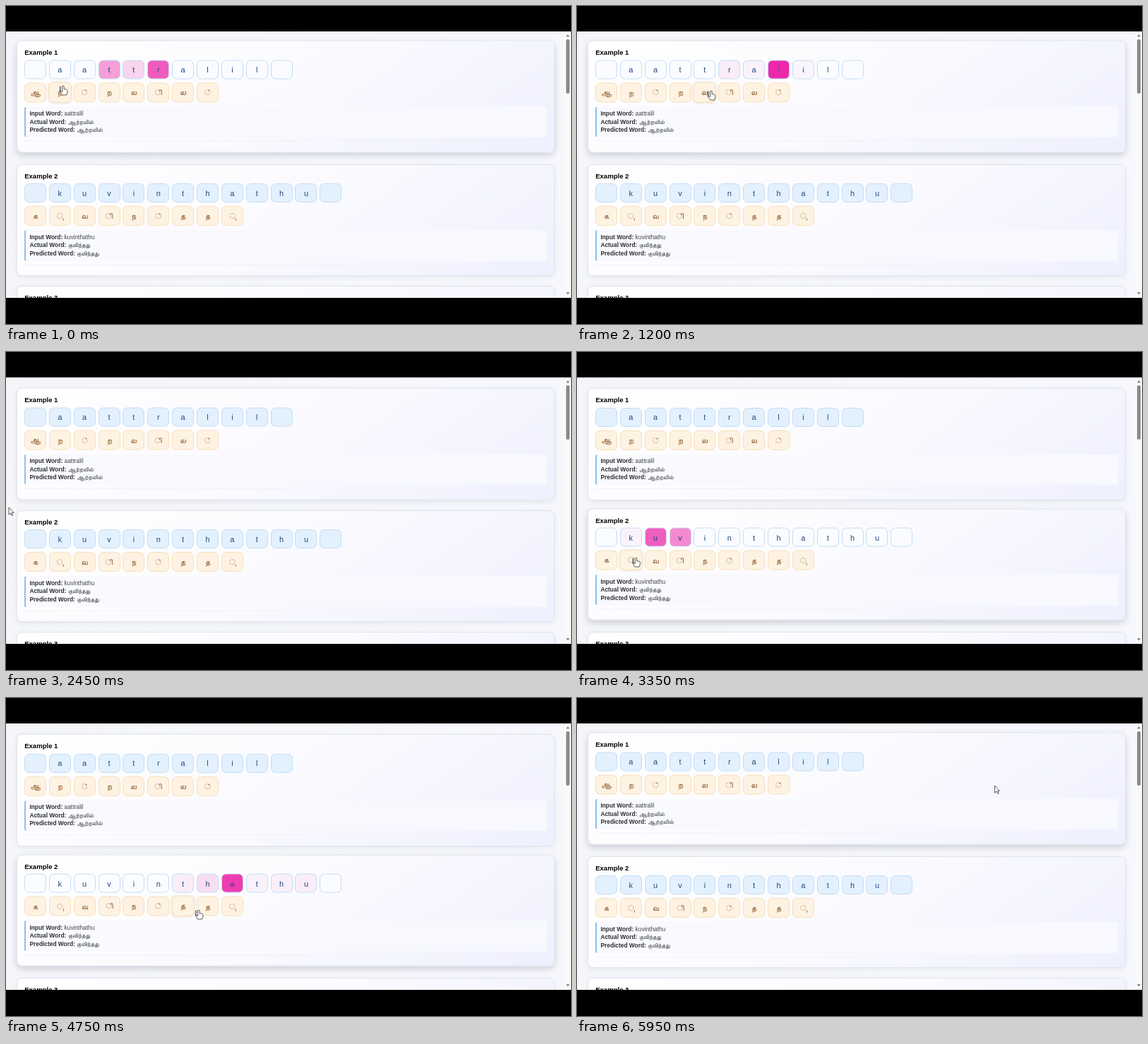
These frames come from a looping animation (800 by 450 pixels, 6000 ms). An HTML page:

```html
<!DOCTYPE html>
<html lang="en">
<head>
<meta charset="utf-8">
<title>Letter attention</title>
<style>
html, body { margin: 0; width: 100%; height: 100%; overflow: hidden; background: #000; }
#stage { position: relative; width: 800px; height: 450px; overflow: hidden; background: #000;
  font-family: "Liberation Sans", Arial, sans-serif; }
#page { position: absolute; top: 36px; width: 800px; height: 376.5px; overflow: hidden;
  background: linear-gradient(100deg, #f4f6fa, #f7f8fd); }
#page *, #cursor { position: absolute; box-sizing: border-box; }
.card { left: 14.5px; width: 762px; height: 158.5px; border: .8px solid #e1e4ee; border-radius: 8px;
  background: linear-gradient(145deg, #fff 0%, #fbfbff 45%, #eff0fe 100%); }
.card h3 { margin: 0; left: 10.7px; top: 10.2px; font-size: 9.55px; line-height: 12px; color: #000; white-space: nowrap; }
.tile { width: 31px; border: 1px solid #c3dcf6; border-radius: 6.5px; display: flex;
  align-items: center; justify-content: center; font-size: 11px; }
#page .tile > *, #page .info b, #page .info svg, #page .info span { position: static; }
.in { top: 26.4px; height: 27px; }
.out { top: 58.3px; height: 28px; background: #fef2e2; border-color: #f9dfb9; color: #85501f; }
.info { left: 10.7px; top: 92.4px; width: 740px; height: 43.5px; border-left: 2px solid #8fbfea;
  border-radius: 3px; background: rgba(249, 250, 255, .9); font-size: 8.4px; color: #41454b; }
.info p { margin: 0; left: 5.2px; line-height: 11px; white-space: pre; }
.info b { color: #2d3036; }
.rule { left: 10.7px; top: 140.8px; width: 740px; height: 1px; background: #f0f1f8; }
svg { overflow: visible; }
.glyph { fill: none; stroke: currentColor; stroke-linecap: round; stroke-linejoin: round; }
#bar { left: 791px; top: 0; width: 9px; height: 377px; background: #fafafb; }
#thumb { left: 2px; top: 10.5px; width: 5px; height: 77.5px; border-radius: 2.5px; background: #8b8b8b; }
#cursor { left: 0; top: 0; }
</style>
</head>
<body>
<div id="stage">
  <div id="page">
    <div id="bar">
      <div id="thumb"></div>
      <svg width="9" height="377" fill="#858585"><path d="M2 7.5 4.5 4 7 7.5ZM2 369 4.5 372.5 7 369Z"/></svg>
    </div>
  </div>
  <svg id="cursor" width="12" height="16" fill="#fff" stroke="#333" stroke-width=".8" stroke-linejoin="round">
    <path id="arrow" d="M0 0V10.2L2.4 8 4 11.6 5.6 10.9 4 7.4H7Z"/>
    <path id="hand" d="M-1.3 .8Q0-.6 1.2.8V5L2.2 4.6 3.4 5.1 4.5 5.2 5.8 6.3V9.6L4.6 13H-1.4L-4.3 8.4Q-4-7.2 -4.3 8.4Q-3.8 6.8 -2.4 7.7L-1.3 8.6Z"/>
  </svg>
</div>
<script>
const LOOP = 6000, STEP = 50, TOP = 36;
const $ = id => document.getElementById(id);

// Tamil letters as pen strokes: [advance, path], baseline at 0
const loop = "M3-5A2.5 2.5 0 1 0 3 0A2.5 2.5 0 1 0 3-5M.5-2.5Q0-10 4.3-10Q8-10 8-5";
const ka = "M1-10H11M5-10V0Q0 0 0-2.5Q0-5 5-5H9Q13-5 13-2.5";
const ta = "M1-10H10M5-10V0Q0 0 0-2.5Q0-5 5-5H9Q13-5 13-1.5";
const ring = "M4-8A3.8 3.8 0 1 0 4-.4A3.8 3.8 0 1 0 4-8";
const PEN = {
  "ஆ": [18, "M3-3A2.2 2.2 0 1 1 6-5Q6 0 3 0Q0 0 0-5Q0-10 4.5-10Q9-10 9-5Q9 2 4 3M9-4H14M14-10V2Q14 5 11 5Q9 5 9 3Q9 1 12 1H17"],
  "ற": [15, "M1 0V-6Q1-10 4-10Q7-10 7-6V0M7-6Q7-10 10-10Q13-10 13-6Q13-1 9 2Q6 4 3 4"],
  "ல": [16, loop + "V-3Q8 0 11 0Q14 0 14-4V-10"],
  "வ": [15, loop + "Q8 0 3 0H13V-10"],
  "க": [15, ka + "Q13 0 10 0"],
  "த": [15, ta + "Q13 3 5 4"],
  "ந": [15, "M1-10H9M4-10V0H8V-2Q8-6 10.5-6Q13-6 13-2Q13 3 6 4"],
  "கு": [16, ka + "Q14 4 6 4Q1 4 0 2"],
  "து": [18, ta + "Q13 3 5 4M13-2Q13 0 16 0V-10"]
};
const SIGN = {
  "்": [0, "M-8-13.4h.1"],
  "ி": [5, "M-2-10Q-2-13.5 1-13.5Q3.5-13.5 3.5-9V0"],
  "ு": [9, "M0-7H2V0M2-4Q2.5-7 5-7Q8-7 8-4V0"]
};

const pen = document.createElement("canvas").getContext("2d");
const width = ch => pen.measureText(ch).width;
const hasTamil = width("ஆ") !== width("ற");

function tamil(word, scale) {
  if (hasTamil) return `<span>${word}</span>`;
  let x = 0, body = "";
  const add = (d, extra = "") => body += `<path transform="translate(${x})" d="${d}" ${extra}/>`;
  for (const part of word.match(/[கத]ு|./gu)) {
    if (SIGN[part]) {
      if (!x) { add(ring, 'stroke-dasharray=".2 1.8"'); x = 9; }
      const dot = part === "்";
      const [adv, d] = SIGN[part];
      add(dot && word.length === 1 ? "M-5-12.6h.1" : d, dot ? 'stroke-width="2.2"' : "");
      x += adv;
    } else {
      add(PEN[part][1]);
      x += PEN[part][0];
    }
  }
  const w = x - 1.5;
  return `<svg class="glyph" aria-label="${word}" width="${w * scale}" height="${18 * scale}" ` +
    `viewBox="0 -14 ${w} 18" stroke-width="1.45" style="vertical-align:${-4 * scale}px">${body}</svg>`;
}

// heat[j] maps input letter -> weight while output letter j is hovered
const DATA = [
  { top: 51.3, latin: "aattralil", word: "ஆற்றலில்", heat: [
    { 1: .8, 2: .4 }, { 3: .42, 4: .18, 5: .72 }, { 4: .3, 5: .8 }, { 5: .85, 6: .1 },
    { 5: .03, 6: .04, 7: 1, 8: .04 }, { 8: .85, 9: .1 }, { 8: .1, 9: .9 }, { 9: .6, 10: .35 }] },
  { top: 223.8, latin: "kuvinthathu", word: "குவிந்தது", heat: [
    { 1: .85, 2: .15 }, { 2: .74, 3: .54 }, { 3: .8, 4: .2 }, { 4: .75, 5: .11, 6: .27, 7: .12 },
    { 5: .8, 6: .15 }, { 6: .8, 7: .2 }, { 6: .03, 7: .13, 8: .9, 9: .05, 10: .06, 11: .07 },
    { 9: .8, 10: .3 }, { 10: .1, 11: .8 }] },
  { top: 396, latin: "", word: "", heat: [] }
];

function make(parent, cls, html = "", css = {}, tag = "div") {
  const el = document.createElement(tag);
  el.className = cls;
  el.innerHTML = html;
  Object.assign(el.style, css);
  parent.append(el);
  return el;
}

const cards = DATA.map((d, n) => {
  const box = make($("page"), "card", "", { top: d.top - TOP + "px" });
  make(box, "", `Example ${n + 1}`, {}, "h3");
  if (!d.word) return { box, ins: [], outs: [] };
  const at = i => ({ left: 10.4 + 34.87 * i + "px" });
  const ins = [...` ${d.latin} `].map((ch, i) => make(box, "tile in", ch.trim(), at(i)));
  const outs = [...d.word].map((ch, i) => make(box, "tile out", tamil(ch, .69), at(i)));
  const info = make(box, "info");
  const word = tamil(d.word, .46);
  [["Input", d.latin], ["Actual", word], ["Predicted", word]].forEach(([name, value], i) =>
    make(info, "", `<b>${name} Word:</b> ${value}`, { top: 4.6 + 11.4 * i + "px" }, "p"));
  make(box, "rule");
  return { box, ins, outs };
});

const PATH = [
  [0, 81, 113], [1200, 190, 120], [1650, 288, 124], [1850, 270, 170], [2050, 130, 190],
  [2300, 12, 204], [2400, 4, 220], [2550, 4, 220], [2750, 24, 262], [3000, 40, 288],
  [3150, 68, 292], [3350, 83.5, 291], [4000, 170, 295], [4750, 273, 300], [5100, 322, 298],
  [5250, 332, 275], [5450, 390, 235], [5700, 540, 160], [5900, 590, 125], [5950, 591.5, 124]
];
const mix = (a, b, p) => a + (b - a) * p;
const blend = (a, b, p) => a.map((v, i) => mix(v, b[i], p));
const rgb = c => `rgb(${c.map(Math.round)})`;

function pointer(t) {
  const k = Math.max(1, PATH.findIndex(p => p[0] >= t));
  const [a, b] = [PATH[k - 1], PATH[k]];
  const p = (t - a[0]) / (b[0] - a[0]);
  return { x: mix(a[1], b[1], p), y: mix(a[2], b[2], p) };
}

function hover({ x, y }) {
  const card = x < 15 ? -1 : DATA.findIndex(d => y > d.top - 2.5 && y < d.top + 157);
  if (card < 0) return { card, tile: -1 };
  const dy = y - DATA[card].top;
  const tile = Math.floor((x - 30.5) / 35);
  const inRow = dy > 56 && dy < 86 && tile >= 0 && tile < cards[card].outs.length;
  return { card, tile: inRow ? tile : -1 };
}

// Ease every value towards its hover goal, one step at a time
function advance(old, h, rate, slow) {
  return cards.map((c, n) => {
    const tile = h.card === n ? h.tile : -1;
    const heat = DATA[n].heat[tile] || {};
    const o = old[n];
    return {
      lift: mix(o.lift, h.card === n ? 1 : 0, slow),
      idle: mix(o.idle, tile < 0 ? 1 : 0, rate),
      heat: o.heat.map((v, i) => mix(v, heat[i] || 0, rate)),
      grow: o.grow.map((v, i) => mix(v, i === tile ? 1 : 0, rate))
    };
  });
}

const blank = cards.map(c => ({ lift: 0, idle: 1, heat: c.ins.map(() => 0), grow: c.outs.map(() => 0) }));
const steps = [];
let state = advance(blank, hover(pointer(0)), 1, 1);
for (let t = 0; t < LOOP; t += STEP) {
  const pos = pointer(t), h = hover(pos);
  state = advance(state, h, .45, .35);
  steps.push({ pos, hand: h.tile >= 0, state });
}

const PALE = [251, 252, 255], PINK = [236, 29, 165], BLUE = [227, 241, 254];
const INK = [31, 73, 125], FADED = [205, 60, 160];

function draw({ pos, hand, state }) {
  state.forEach((s, n) => {
    const { box, ins, outs } = cards[n];
    box.style.transform = `translateY(${-2.5 * s.lift}px)`;
    box.style.boxShadow = `0 ${mix(2, 4, s.lift)}px ${mix(7, 10, s.lift)}px rgba(40,45,70,${mix(.08, .19, s.lift)})`;
    ins.forEach((el, i) => {
      const w = s.heat[i];
      el.style.background = rgb(blend(blend(PALE, PINK, w), BLUE, s.idle));
      el.style.color = rgb(blend(INK, FADED, Math.max(0, (w - .85) / .15)));
    });
    outs.forEach((el, i) => {
      const g = s.grow[i];
      el.style.transform = `translateY(${-.4 * g}px) scale(${1 + .05 * g})`;
      el.style.boxShadow = `0 1px 4px rgba(90,60,20,${.14 * g})`;
    });
  });
  $("cursor").style.transform = `translate(${pos.x}px,${pos.y}px)`;
  $("hand").style.display = hand ? "" : "none";
  $("arrow").style.display = hand ? "none" : "";
}

const start = performance.now();
function tick() {
  const t = Math.max(0, performance.now() - start) % LOOP;
  draw(steps[Math.floor(t / STEP)]);
  requestAnimationFrame(tick);
}
tick();
</script>
</body>
</html>
```
